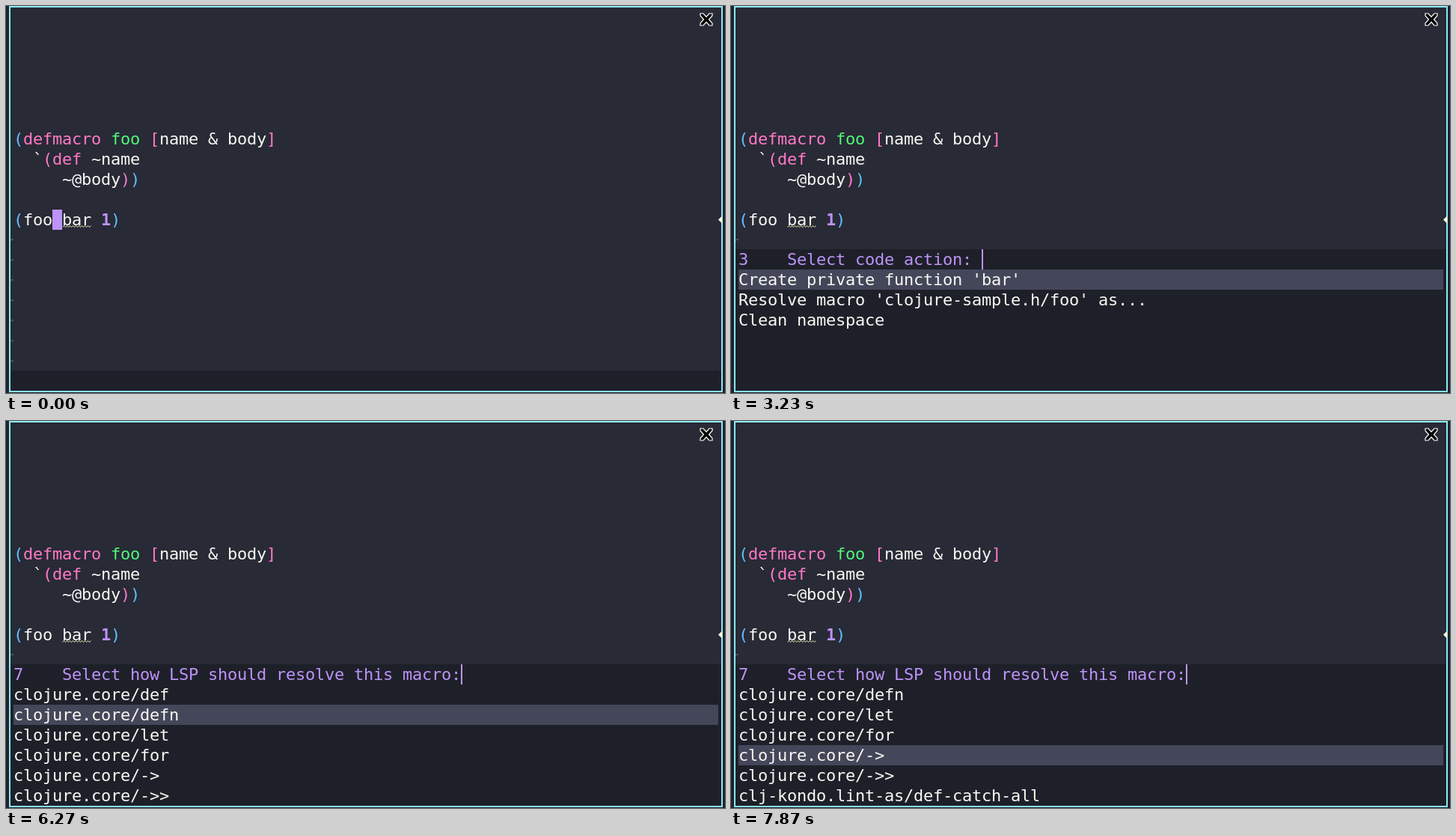
An HTML page that plays this animation: 961x517 px, repeating every 8000 ms.

```html
<!DOCTYPE html>
<html lang="en">
<head>
<meta charset="utf-8">
<style>
  html, body { margin: 0; width: 100%; height: 100%; overflow: hidden; background: #20232b; }
  #win { position: absolute; left: 4px; top: 0; width: 950px; height: 512px; border: 2px solid #8be9fd; background: #282a36; }
  #stage { position: absolute; left: 0; top: 0; width: 961px; height: 517px; overflow: hidden; }
  #stage, #stage pre { font: 22px/27px "DejaVu Sans Mono", monospace; letter-spacing: calc(13px - 1ch); color: #f8f8f2; }
  pre { position: absolute; left: 10px; margin: 0; white-space: pre; }
  svg, .box { position: absolute; }
  .box { box-sizing: border-box; }
  #echo, #panel { left: 6px; width: 950px; background: #1e2029; }
  #echo { top: 487px; height: 27px; }
  #panel { top: 325px; height: 189px; overflow: hidden; }
  #panel pre { left: 4px; }
  #echo pre { left: 4px; top: 0; }
  #cursor { top: 272px; width: 13px; height: 27px; background: #bd93f9; color: #282a36; }
  #stage #hint { left: 75px; top: 299px; width: 572px; background: #1e2029; color: #bd93f9; }
  #stage #prompt { top: 0; color: #bd93f9; }
  #items { top: 27px; }
  #bar { top: 0; width: 2px; height: 27px; background: #bd93f9; }
  #pick { left: 4px; width: 942px; height: 27px; background: #44475a; }
  .b { color: #61bfff } .p { color: #ff79c6 } .g { color: #50fa7b } .n { color: #bd93f9; font-weight: bold }
</style>
</head>
<body>
<div id="win"></div>
<div id="stage">
  <pre style="top:164px"><span class="b">(</span><span class="p">defmacro</span> <span class="g">foo</span> <span class="p">[</span>name &amp; body<span class="p">]</span>
  `<span class="p">(def</span> ~name
     ~@body<span class="p">)</span><span class="b">)</span>

<span class="b">(</span>foo bar <span class="n">1</span><span class="b">)</span></pre>
  <div class="box" id="cursor"></div>
  <svg width="961" height="517">
    <g id="tildes" fill="#565761"></g>
    <path id="wave" fill="none" stroke="#f4f8b8"/>
    <path d="M952 285.5L957 280.5V290.5Z" fill="#f8f9d2"/>
    <path d="M-8-8H-4L0-3.5L4-8H8V-5L3.5 0L8 5V8H4L0 3.5L-4 8H-8V5L-3.5 0L-8-5Z"
      transform="translate(936 18)" fill="#000" stroke="#fff" stroke-width="1.2"/>
  </svg>
  <pre id="hint">X Unresolved symbol: bar [unresolved-symbol]</pre>
  <div class="box" id="echo"><pre id="keys"></pre></div>
  <div class="box" id="panel">
    <div class="box" id="pick"></div>
    <pre id="prompt"></pre>
    <div class="box" id="bar"></div>
    <pre id="items"></pre>
  </div>
</div>
<script>
const $ = id => document.getElementById(id);
const LOOP = 8000, CELL = 13, ROW = 27;

const actions = {
  prompt: "3    Select code action: ",
  items: ["Create private function 'bar'", "Resolve macro 'clojure-sample.h/foo' as...", "Clean namespace"]
};
const macros = {
  prompt: "7    Select how LSP should resolve this macro:",
  items: [..."def defn let for -> ->>".split(" ").map(s => "clojure.core/" + s), "clj-kondo.lint-as/def-catch-all"]
};

// Each entry: start time, value
const keys = [[0, ""], [2230, "SPC-"], [2630, "SPC c-"], [3000, "SPC c a"], [3230, ""]];
const menus = [[0, null], [3230, actions], [5470, macros]];
const picks = [[0, 0], [3970, 1], [5470, 0], [6270, 1], [6500, 2], [6630, 3], [6870, 4], [7000, 5], [7870, 4]];
const scrolls = [[0, 0], [7000, 1]];
const at = (track, t) => track.findLast(([start]) => start <= t)[1];

const show = (id, on) => $(id).style.visibility = on ? "visible" : "hidden";

// Fringe tildes, one per empty row
for (let i = 0; i < 7; i++)
  $("tildes").innerHTML += `<path d="M7 ${311 + i * ROW}h3v2h-1v-1h-1v1h-1v1h-1v-2h1z"/>`;

let zigzag = "M75.5 295.5";
for (let x = 2; x <= 38; x += 2) zigzag += `L${75.5 + x} ${x % 4 ? 293.5 : 295.5}`;
$("wave").setAttribute("d", zigzag);

function draw(t) {
  const menu = at(menus, t), moved = t >= 670;
  const hint = t >= 1070 && !menu;
  show("cursor", !menu);
  $("cursor").style.left = 10 + CELL * (moved ? 5 : 4) + "px";
  $("cursor").textContent = moved ? "b" : "";
  show("hint", hint);
  show("tildes", !hint);
  $("keys").textContent = at(keys, t);
  $("panel").style.display = menu ? "block" : "none";
  if (!menu) return;
  const top = at(scrolls, t);
  $("prompt").textContent = menu.prompt;
  $("bar").style.left = 4 + CELL * menu.prompt.length + "px";
  $("items").textContent = menu.items.slice(top, top + 6).join("\n");
  $("pick").style.top = ROW * (1 + at(picks, t) - top) + "px";
}

let began;
function tick(now) {
  began ??= now;
  draw((now - began) % LOOP);
  requestAnimationFrame(tick);
}
draw(0);
requestAnimationFrame(tick);
</script>
</body>
</html>
```
